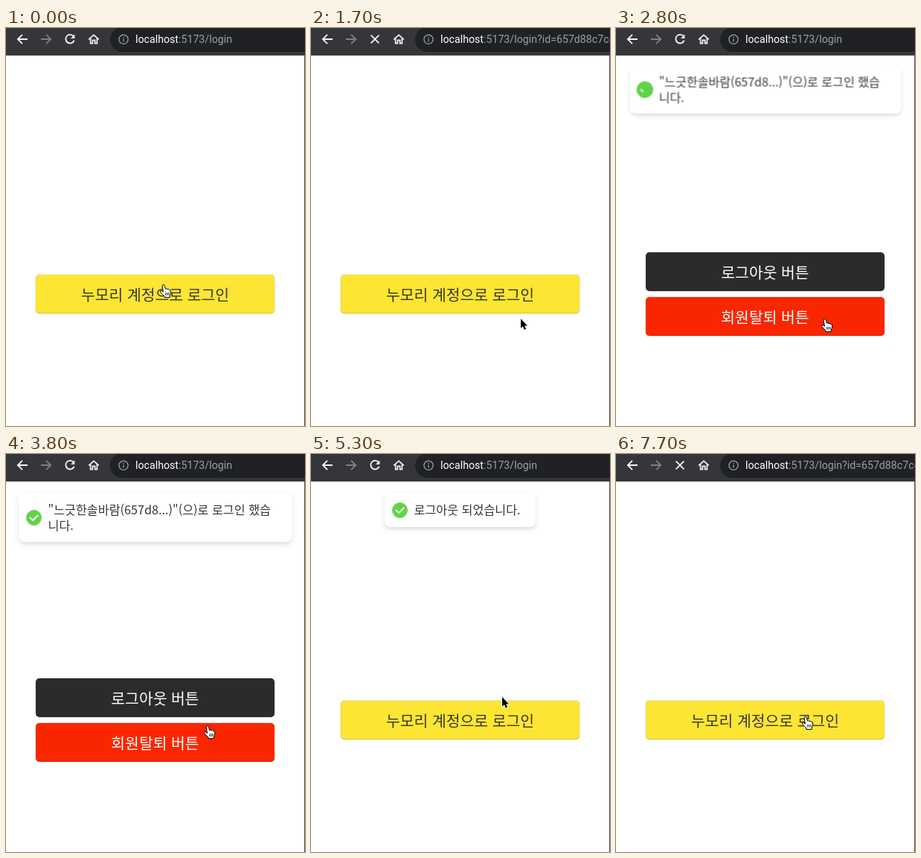
An HTML page that plays this animation: 402 px wide and 534 px high, repeating every 8 s.

```html
<!DOCTYPE html>
<html lang="ko">
<head>
<meta charset="utf-8">
<title>Login flow</title>
<style>
html, body { margin: 0; width: 100%; height: 100%; overflow: hidden; background: #fff; }
#stage { position: relative; width: 402px; height: 534px; overflow: hidden; background: #fff;
  font-family: "Noto Sans CJK KR", "Noto Sans KR", "Noto Sans CJK", sans-serif; }
#stage > *, .toast > * { position: absolute; }
#edge { right: 0; top: 37px; width: 1px; height: 497px; background: #4b4b4d; }
#bar { left: 0; top: 0; width: 402px; height: 36px; background: #35363a; border-bottom: 1px solid #4a4b4f; }
#pill { position: absolute; left: 140px; top: -1px; width: 290px; height: 33px; border-radius: 17px; background: #202124; }
#url { position: absolute; left: 174px; top: 5px; font: 14.2px/20px Roboto, sans-serif; color: #9aa0a6; white-space: nowrap; }
#url b { font-weight: 400; color: #fff; }
#bar svg { position: absolute; left: 0; top: 0; }
.btn { left: 40px; width: 321px; height: 52px; border-radius: 5px; font-size: 20.4px; line-height: 52px;
  font-weight: 500; text-align: center; color: #fff; white-space: nowrap;
  box-shadow: 0 0 2px rgba(0,0,0,.3), inset 0 -1px 1px rgba(0,0,0,.12); }
#login { top: 331px; background: #fce633; color: #3b3731; }
#logout { top: 301px; background: #2b2b2b; }
#leave { top: 361px; background: #fa2600; }
#toasts { left: 0; top: 37px; width: 402px; height: 497px; overflow: hidden; }
.toast { position: absolute; top: 15px; border-radius: 8px; background: #fff; color: #363636;
  box-shadow: 0 3px 10px rgba(0,0,0,.1), 0 3px 3px rgba(0,0,0,.05); }
#hello { left: 16.5px; width: 368px; height: 66px; }
#bye { left: 99px; width: 203px; height: 46px; }
.toast p { left: 39.5px; top: 12px; margin: 0; font-size: 16.2px; line-height: 21px; white-space: nowrap; }
.icon { left: 10px; top: calc(50% - 10.5px); width: 21px; height: 21px; border-radius: 50%; background: #61d345; }
.tick { position: absolute; box-sizing: border-box; left: 6.3px; bottom: 6.3px; width: 6.3px; height: 10.5px;
  border: solid #fff; border-width: 0 2.1px 2.1px 0; }
#over { left: 0; top: 0; }
</style>
</head>
<body>
<div id="stage">
  <div id="edge"></div>
  <div class="btn" id="login"><span id="label">누모리 계정으로 로그인</span></div>
  <div class="btn" id="logout">로그아웃 버튼</div>
  <div class="btn" id="leave">회원탈퇴 버튼</div>
  <div id="toasts">
    <div class="toast" id="hello"><div class="icon"><div class="tick"></div></div><p>"느긋한솔바람(657d8...)"(으)로 로그인 했습<br>니다.</p></div>
    <div class="toast" id="bye"><div class="icon"><div class="tick"></div></div><p>로그아웃 되었습니다.</p></div>
  </div>
  <div id="bar">
    <div id="pill"></div>
    <svg width="402" height="36" fill="none" stroke="#f1f3f4" stroke-width="1.8">
      <path d="M29 15H16.5M22 8.8L15.8 15L22 21.2"/>
      <path d="M47 15H59.5M54 8.8L60.2 15L54 21.2" stroke="#7e8084"/>
      <g id="reload"><path d="M90.8 11.2A5.8 5.8 0 1 0 91.6 16.6"/><path d="M92.4 8.6V14H87Z" fill="#f1f3f4" stroke="none"/></g>
      <path id="stop" d="M80.6 9.6L91.4 20.4M91.4 9.6L80.6 20.4"/>
      <path d="M111.2 15.4L118 9.4L124.8 15.4M113.6 14V20.6H116.4V16.4H119.6V20.6H122.4V14" stroke-width="1.7"/>
      <g stroke="#9aa0a6" stroke-width="1.3"><circle cx="158" cy="15.3" r="6.1"/><path d="M158 14.4V18.6M158 11.8V13.2"/></g>
    </svg>
    <div id="url"><b>localhost</b>:5173/login<span id="query">?id=657d88c7c41</span></div>
  </div>
  <svg id="over" width="402" height="534">
    <g id="ring" fill="none">
      <circle r="31.2" stroke="#000" stroke-width="1.6"/>
      <circle r="29.6" stroke="#fff" stroke-width="1.7"/>
      <circle r="28.3" stroke="#333" stroke-width="1"/>
    </g>
    <g id="hand" stroke="#000" stroke-linejoin="round">
      <path fill="#fff" d="M-1.9 1.2Q-1.8-.6-.4-.6Q1.1-.6 1.5 1.2L2.4 5.2Q3.8 4 4.9 5.4Q6.5 4.6 7.3 6.2Q9.3 5.7 9.6 8Q9.8 12 8.2 14V16.4H1V15Q-1.4 12.5-4.5 9.2Q-4.8 7-2.6 7.6L-.6 9.2Z"/>
      <path fill="none" stroke-width=".9" d="M2.7 9.8V13.6M4.8 9.8V13.6M6.9 9.8V13.6"/>
    </g>
    <path id="arrow" d="M0 0V12.8L2.9 10.2L4.9 14.8L7.1 13.9L5.2 9.4H9Z" stroke="#fff" stroke-width="1.6" paint-order="stroke"/>
  </svg>
</div>
<script>
const LOOP = 8000, STEP = 100;
const $ = id => document.getElementById(id);

// time, x, y, pointer, 1 = glide here from the previous row
const path = [
  [0, 212, 345, 'hand'],
  [100, 213, 345, 'hand'],
  [1000, 213, 345, 'hand'],
  [1400, 268, 371, 'hand', 1],
  [1600, 279, 381, 'hand'],
  [1700, 282, 390, 'arrow'],
  [2600, 281, 391, 'hand'],
  [3500, 281, 391, 'hand'],
  [4200, 256, 326, 'hand', 1],
  [4900, 257, 326, 'arrow'],
  [6100, 257, 326, 'arrow'],
  [6600, 255, 353, 'hand', 1]
];

// spans of time during which each part is on screen
const spans = {
  ring: [[400, 600], [4700, 4900], [6900, 7100]],
  stop: [[500, 2600], [7000, LOOP]],
  reload: [[0, 500], [2600, 7000]],
  query: [[1100, 2300], [7700, LOOP]],
  login: [[0, 2400], [4900, LOOP]],
  label: [[0, 2300], [4900, LOOP]],
  logout: [[2400, 4900]],
  leave: [[2400, 4900]],
  hello: [[2600, 4500]],
  bye: [[4900, 6900]]
};

const motions = [];
function motion(el, start, duration, frames, easing = 'linear') {
  const anim = el.animate(frames, { duration, easing, fill: 'both' });
  anim.pause();
  motions.push({ anim, start });
}

function addToast(id, start) {
  const box = $(id);
  motion(box, start, 350, [
    { transform: 'translateY(-200%) scale(.6)', opacity: .5 },
    { transform: 'translateY(0) scale(1)', opacity: 1 }
  ], 'cubic-bezier(.21,1.02,.73,1)');
  motion(box.querySelector('.icon'), start + 100, 300, [
    { transform: 'scale(0) rotate(45deg)', opacity: 0 },
    { transform: 'scale(1) rotate(45deg)', opacity: 1 }
  ], 'cubic-bezier(.175,.885,.32,1.275)');
  motion(box.querySelector('.tick'), start + 200, 200, [
    { width: '0px', height: '0px', opacity: 0, easing: 'ease-out' },
    { width: '6.3px', height: '0px', opacity: 1, offset: .4, easing: 'ease-out' },
    { width: '6.3px', height: '10.5px', opacity: 1 }
  ]);
}
addToast('hello', 2550);
addToast('bye', 4850);

const smooth = p => p * p * (3 - 2 * p);

function pointerAt(t) {
  let i = path.length - 1;
  while (path[i][0] > t) i--;
  const [t0, x, y, kind] = path[i], next = path[i + 1];
  if (!next || !next[4]) return { x, y, kind };
  const p = smooth((t - t0) / (next[0] - t0));
  const at = { x: x + (next[1] - x) * p, y: y + (next[2] - y) * p, kind };
  if (kind === 'arrow' && at.y > 331) at.kind = next[3];
  return at;
}

function draw(t) {
  for (const id in spans) {
    const on = spans[id].some(([a, b]) => t >= a && t < b);
    $(id).style.display = on ? '' : 'none';
  }
  const { x, y, kind } = pointerAt(t);
  for (const id of ['hand', 'arrow', 'ring']) $(id).setAttribute('transform', `translate(${x} ${y})`);
  $('hand').style.display = kind === 'hand' ? '' : 'none';
  $('arrow').style.display = kind === 'arrow' ? '' : 'none';
  for (const { anim, start } of motions) anim.currentTime = Math.max(0, t - start);
}

const begin = performance.now();
function tick() {
  const t = (performance.now() - begin) % LOOP;
  draw(Math.floor(t / STEP) * STEP);
  requestAnimationFrame(tick);
}
draw(0);
requestAnimationFrame(tick);
</script>
</body>
</html>
```
